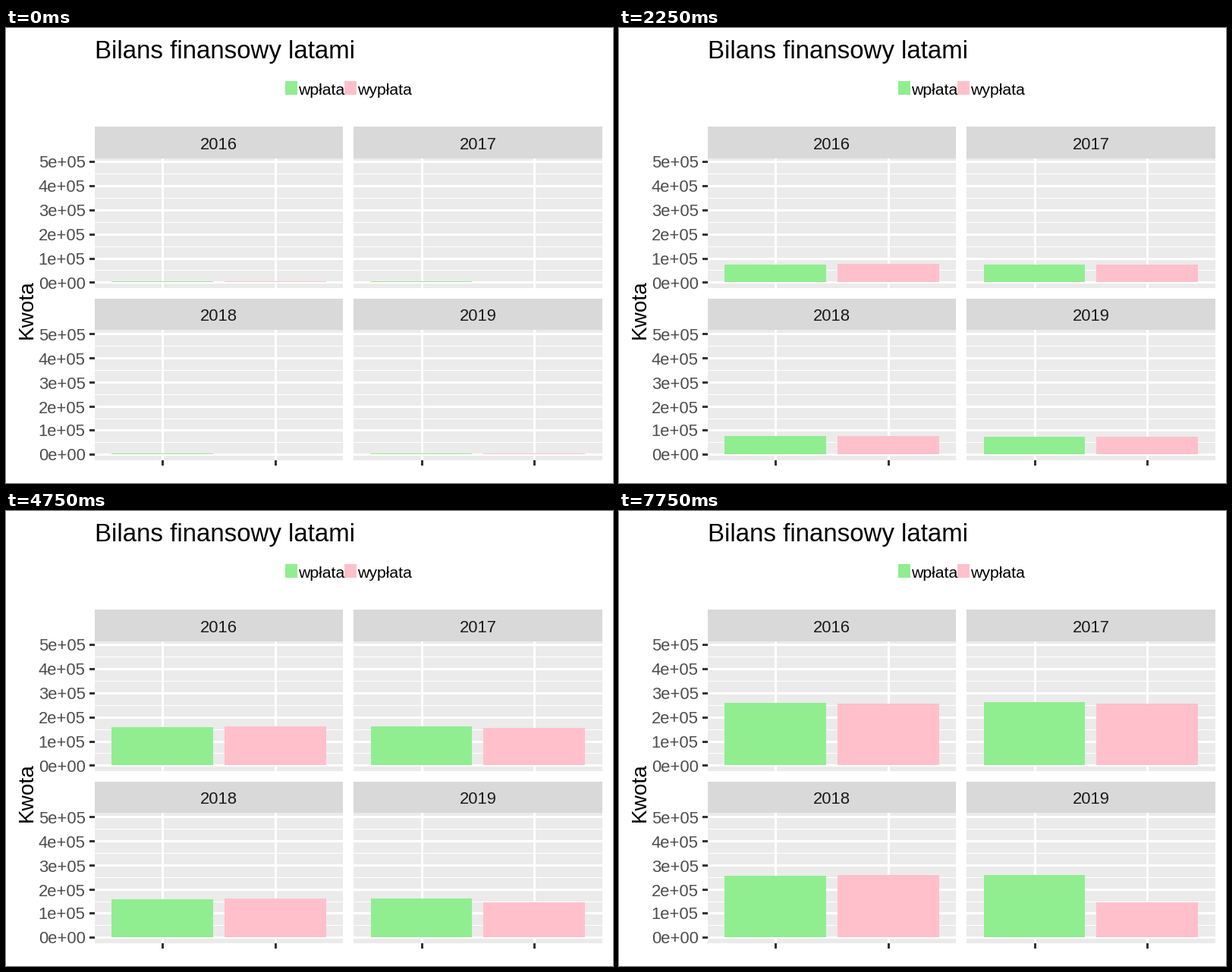
A matplotlib script that plays this animation: 800x600 px, repeating every 8000 ms.

```python
import numpy as np
import matplotlib.pyplot as plt
from matplotlib.animation import FuncAnimation
from matplotlib.patches import Rectangle

plt.rcParams["font.family"] = "Liberation Sans"

W, H, DPI = 800, 600, 100
FRAMES, INTERVAL = 32, 250
GREEN, PINK = "#90EE90", "#FFC0CB"
UNIT = 31.77  # pixels per 1e5

fig = plt.figure(figsize=(W / DPI, H / DPI), dpi=DPI, facecolor="white")
ax = fig.add_axes([0, 0, 1, 1])
ax.set_xlim(0, W)
ax.set_ylim(H, 0)
ax.axis("off")


def box(x0, y0, x1, y1, color, z=1):
    patch = Rectangle((x0, y0), x1 - x0, y1 - y0, facecolor=color,
                      linewidth=0, antialiased=False, zorder=z)
    return ax.add_patch(patch)


def label(x, y, s, px, color="black", ha="left", rotation=0):
    ax.text(x, y, s, fontsize=px * 72 / DPI, color=color, ha=ha,
            va="baseline", rotation=rotation, rotation_mode="anchor", zorder=5)


def panel(x0, x1, top, zero, year, grid_x):
    bottom = {130: 343, 357: 570}[top]
    strip = {130: 172, 357: 398}[top]
    box(x0, top, x1, strip, "#D9D9D9")
    box(x0, strip, x1, bottom, "#EBEBEB")
    label((x0 + x1) / 2, strip - 11.5, year, 22, "#1A1A1A", "center")
    for k in range(5):
        y = round(zero - (k + 0.5) * UNIT)
        box(x0, y, x1, y + 1, "white", 2)
    for k in range(6):
        y = round(zero - k * UNIT)
        box(x0, y - 1, x1, y + 2, "white", 2)
    for x in grid_x:
        box(x - 1, strip, x + 2, bottom, "white", 2)


LEFT, RIGHT = (117, 444), (458, 786)
GRID_L, GRID_R = (206, 355), (548, 696)
UPPER, LOWER = (130, 335.3), (357, 562.2)

panel(*LEFT, *UPPER, "2016", GRID_L)
panel(*RIGHT, *UPPER, "2017", GRID_R)
panel(*LEFT, *LOWER, "2018", GRID_L)
panel(*RIGHT, *LOWER, "2019", GRID_R)

# axes
for _, zero in (UPPER, LOWER):
    for k in range(6):
        y = round(zero - k * UNIT)
        box(110, y - 1, 117, y + 2, "#333333")
        label(104.5, y + 8.5, f"{k}e+05" if k else "0e+00", 22, "#4D4D4D", "right")
for x in GRID_L + GRID_R:
    box(x - 1, 570, x + 2, 577, "#333333")

# titles and legend
label(117, 40, "Bilans finansowy latami", 33)
label(35, 371, "Kwota", 28, ha="center", rotation=90)
box(368, 70, 384, 88, GREEN)
box(446, 70, 462, 88, PINK)
label(385, 88, "wpłata", 21.3)
label(463, 88, "wypłata", 21.3)

# bar heights in pixels at a few key steps
STEPS = [0, 3, 9, 16, 22, 27, 31]
HEIGHTS = [
    [1, 9, 23, 41, 58, 72, 82],
    [1, 7, 24, 43, 59, 72, 81],
    [1, 9, 23, 43, 59, 72, 83],
    [0, 8, 23, 41, 57, 70, 81],
    [1, 8, 24, 42, 58, 71, 81],
    [0, 9, 24, 43, 59, 72, 82],
    [1, 9, 23, 43, 59, 72, 82],
    [1, 9, 23, 42, 58, 72, 82],
]
LAST_CAP = 46  # the final payout stops growing here

SPANS = [(139, 273), (288, 422), (481, 614), (629, 763)]
bars = []
for base in (335, 562):
    for i, (x0, x1) in enumerate(SPANS):
        bars.append((base, box(x0, base, x1, base, PINK if i % 2 else GREEN, 3)))


def draw(step):
    for i, (base, bar) in enumerate(bars):
        h = np.interp(step, STEPS, HEIGHTS[i])
        if i == len(bars) - 1:
            h = min(h, LAST_CAP)
        h = int(h + 0.5)
        bar.set_y(base - h)
        bar.set_height(h)
        bar.set_visible(h > 0)
    return [bar for _, bar in bars]


anim = FuncAnimation(fig, draw, frames=FRAMES, interval=INTERVAL,
                     repeat=True, repeat_delay=0, blit=False)
plt.show()
```
